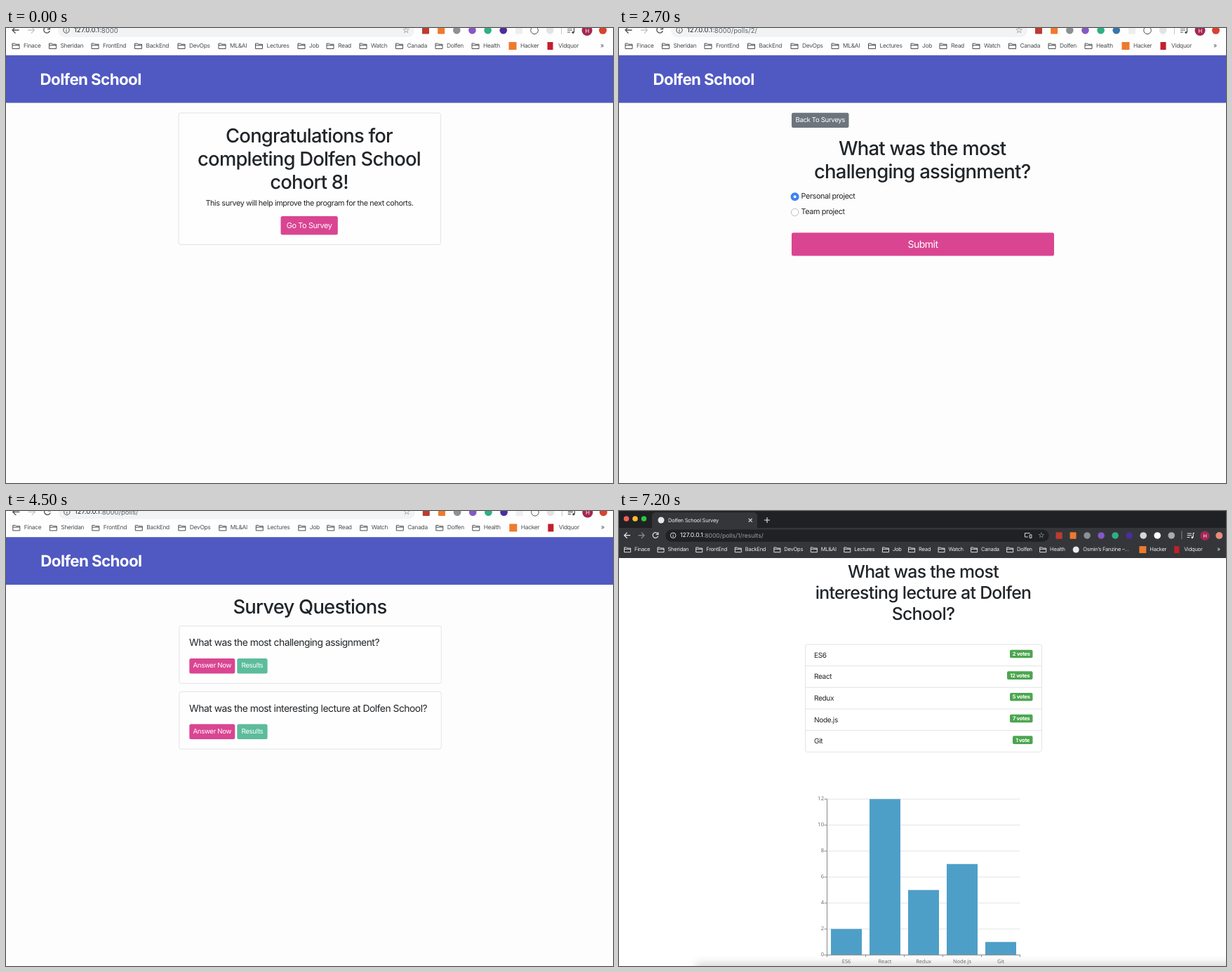
An HTML page that plays this animation: 865 by 648 pixels, repeating every 8000 ms.

```html
<!DOCTYPE html>
<html lang="en">
<head>
<meta charset="utf-8">
<title>Survey walkthrough</title>
<style>
  html, body { margin: 0; width: 100%; height: 100%; overflow: hidden; background: #fdfdfd; }
  svg { display: block; width: 865px; height: 648px; }
  text { font-family: Inter, sans-serif; dominant-baseline: central; letter-spacing: -.035em; text-rendering: geometricPrecision; white-space: pre; }
  .big { letter-spacing: -.028em; }
  .url text { letter-spacing: 0; }
  .star text { font-family: "DejaVu Sans", sans-serif; }
  .chart text { font-family: "Open Sans", sans-serif; letter-spacing: 0; }
</style>
</head>
<body>
<svg id="stage" viewBox="0 0 865 648"></svg>
<script>
const INK = '#212529', PINK = '#da4592', GREEN = '#5cbc9c', GREY = '#6c757d', BRAND = '#5059c1', LINE = '#e3e3e3';
const SCHOOL = 'Dolfen School';
const CHALLENGE = ['What was the most', 'challenging assignment?'];
const LECTURE = ['What was the most', 'interesting lecture at Dolfen', 'School?'];
const PROJECTS = ['Personal project', 'Team project'];
const TOPICS = ['ES6', 'React', 'Redux', 'Node.js', 'Git'];
const BOOKMARKS = ['Finace', 'Sheridan', 'FrontEnd', 'BackEnd', 'DevOps', 'ML&amp;AI', 'Lectures', 'Job', 'Read', 'Watch', 'Canada', 'Dolfen', 'Health'];
const BOOKMARK_X = [25, 77.5, 138, 199.5, 261, 319, 371.5, 432, 473, 520, 571.5, 628, 680];

const text = (x, y, str, size, fill = INK, anchor = 'start', weight = 400) =>
  `<text x="${x}" y="${y}" font-size="${size}" fill="${fill}" text-anchor="${anchor}" font-weight="${weight}"${size > 20 ? ' class="big"' : ''}>${str}</text>`;
const rect = (x, y, w, h, fill, r = 0, extra = '') =>
  `<rect x="${x}" y="${y}" width="${w}" height="${h}" rx="${r}" fill="${fill}" ${extra}/>`;
const circle = (x, y, r, fill, extra = '') => `<circle cx="${x}" cy="${y}" r="${r}" fill="${fill}" ${extra}/>`;
const path = (d, stroke, width = 1, extra = '') =>
  `<path d="${d}" fill="none" stroke="${stroke}" stroke-width="${width}" ${extra}/>`;
const move = (transform, body) => `<g transform="${transform}">${body}</g>`;
const styled = (name, body) => `<g class="${name}">${body}</g>`;
const button = (x, y, w, h, label, size, fill) =>
  rect(x, y, w, h, fill, 2.5) + text(x + w / 2, y + h / 2, label, size, '#fff', 'middle');
const card = (y, h) => rect(246, y, 373.5, h, '#fefefe', 3, `stroke="${LINE}"`);
const heading = (lines, x, y, size, step) =>
  lines.map((line, i) => text(x, y + i * step, line, size, INK, 'middle', 500)).join('');

// Browser controls and bookmarks; the dark window is wider, so its right part moves by `shift`.
function toolbar(url, dark, question) {
  const ink = dark ? '#e8eaed' : '#4b4e52', faint = dark ? '#8b8d91' : '#c4c6c9';
  const shift = dark ? 96.3 : 0, gap = dark ? 8 : 0;
  const host = url.slice(0, 9), rest = url.slice(9);
  const left =
    rect(74, -6, 508 + shift, 19, dark ? '#202124' : '#f1f3f4', 9.5) +
    path('M18.5 3h-9M13.5 -1.5L9 3l4.5 4.5', ink, 1.3) +
    path('M31 3h9M36 -1.5L40.5 3l-4.5 4.5', faint, 1.3) +
    path('M61.5 0a4.3 4.3 0 1 0 .8 4M62.5 -2v3.5h-3.5', ink, 1.3) +
    circle(86, 3, 4.2, 'none', `stroke="${ink}"`) + path('M86 2.5v3M86 .5v1', ink) +
    styled('url', text(97, 3.5, `${host}<tspan fill="${dark ? '#9aa0a6' : '#5f6368'}">${rest}</tspan>`, 9.5, dark ? '#fff' : INK)) +
    BOOKMARKS.map((name, i) => {
      const x = BOOKMARK_X[i];
      return move(`translate(${x - 16.5} 20.5)`,
        path('M.5 1.5h3.6l1 1.2h5.4v6.3h-10zM.5 4.2h10', ink, 1, `fill="${dark ? 'none' : '#d5d6d8'}"`)) +
        text(x, 25.5, name, 8.4, ink);
    }).join('') +
    (dark ? path('M640.5 -.5h8M640.5 -.5v6h5M648 2h3v5h-3z', ink) + circle(721, 25.5, 5, ink) +
      text(732, 25.5, 'Osmin’s Fanzine –…', 8.4, ink) : '');

  const icons = ['#bd3b32', '#ee7a2e', '#8d9094', '#8558c4', '#2faf83', question ? '#3974a8' : '#4b2d9c',
    dark ? '#d5d7da' : '#eeeeef', dark ? '#fff' : 'none', dark ? '#a8abaf' : '#e2e3e5'];
  const right =
    styled('star', text(570, 3, '☆', 12, ink, 'middle')) +
    icons.map((fill, i) => {
      const x = 598 + i * 22.15;
      return i < 2 || i === 6 && !dark ? rect(x - 5, -2, 10, 10.5, fill, 1)
        : circle(x, 3.3, 5.3, fill, fill === 'none' ? `stroke="${ink}"` : '');
    }).join('') +
    path('M791.5 -4v13', faint) +
    path('M800 0h7M800 3h7M800 6h4M809.5 6v-6.5h2', ink, 1.2) + circle(808, 6.3, 1.6, ink) +
    circle(828, 3.5, 7.5, '#a32754') + text(828, 3.5, 'H', 8, '#fff', 'middle') +
    circle(850.5, 3.3, 5.5, dark ? '#e58c7b' : '#d9422e') +
    move(`translate(${gap} 0)`,
      rect(716.5, 20, 11, 11, '#ee7a2e') + text(733, 25.5, 'Hacker', 8.4, ink) +
      rect(771.5, 20, 8, 11, '#c21f2c') + text(787, 25.5, 'Vidquor', 8.4, ink)) +
    text(849.5, 25.5, '»', 9, ink, 'middle');
  return left + move(`translate(${shift} 0)`, right);
}

// Light window; every page sits slightly off from the previous one.
const page = (dx, dy, route, body, question) => move(`translate(${dx} ${dy})`,
  rect(-9, -9, 890, 48, '#fefefe') + toolbar('127.0.0.1:8000' + route, false, question) +
  rect(-9, 38.8, 890, 67.8, BRAND) + text(48.5, 73.5, SCHOOL, 22.4, '#fff', 'start', 700) + body);

const welcome = () => page(0, 0, '', card(121, 187.5) +
  heading(['Congratulations for', `completing ${SCHOOL}`, 'cohort 8!'], 432, 152.5, 27.4, 33.3) +
  text(432.5, 249, 'This survey will help improve the program for the next cohorts.', 10.8, INK, 'middle') +
  button(391.5, 268, 81.3, 26.5, 'Go To Survey', 10.9, PINK));

const survey = (dx, dy) => page(dx, dy, '/polls/',
  heading(['Survey Questions'], 432.2, 138, 27.4, 0) +
  [CHALLENGE.join(' '), `What was the most interesting lecture at ${SCHOOL}?`].map((question, i) => {
    const y = 165.4 + i * 93.5;
    return card(y, 81.7) + text(260.3, y + 24.7, question, 13.85) +
      button(260.5, y + 46.2, 65, 21.4, 'Answer Now', 9.7, PINK) +
      button(328.5, y + 46.2, 43.3, 21.4, 'Results', 9.7, GREEN);
  }).join(''));

function poll(dx, dy, id, lines, options, picked) {
  const top = 240 + 33.3 * (lines.length - 2);
  const radios = options.map((option, i) => {
    const y = top + i * 22.15;
    return (i === picked
      ? circle(250.6, y + .3, 6, '#3f83f2') + circle(250.6, y + .3, 2, '#fff')
      : circle(250.6, y + .3, 5.2, '#fff', 'stroke="#bbb"')) + text(259.5, y - .3, option, 10.8);
  }).join('');
  return page(dx, dy, `/polls/${id}/`, button(246, 120.7, 81.5, 21.3, 'Back To Surveys', 9.6, GREY) +
    heading(lines, 432.2, 170.5, 27.5, 33.3) + radios +
    button(246, top + 22.15 * options.length + 7.2, 374, 33, 'Submit', 14, PINK), true);
}

function chart(top, labels, votes) {
  const x0 = 296.5, width = 275, bottom = top + 222, max = Math.max(...votes), step = width / labels.length;
  let out = '';
  for (let v = 0; v <= max; v += 2) {
    const y = bottom - 222 * v / max;
    out += path(`M${x0} ${y}h${width}`, LINE) + path(`M${x0 - 4} ${y}h4`, '#888') +
      text(x0 - 4.5, y, v, 7.6, '#666', 'end');
  }
  labels.forEach((label, i) => {
    const x = x0 + i * step, h = 222 * votes[i] / max;
    out += rect(x + step * .1, bottom - h, step * .8, h, '#4e9fc8') +
      path(`M${x} ${bottom}v3`, '#888') + text(x + step / 2, bottom + 9.5, label, 7.4, '#666', 'middle');
  });
  return styled('chart', out + path(`M${x0} ${top}V${bottom}h${width}v3`, '#888'));
}

function results(id, lines, labels, votes, scroll) {
  const first = 186 - scroll, list = first + 30 * (lines.length - 1) + 44, row = 30.65;
  const rows = labels.map((label, i) => {
    const y = list + i * row, badge = votes[i] + (votes[i] > 1 ? ' votes' : ' vote');
    const w = 4 * badge.length + 4.5;
    return (i ? path(`M265.5 ${y}h337`, LINE) : '') + text(278, y + 15.7, label, 10.1) +
      rect(589.5 - w, y + 7.7, w, 11.6, '#4ca64f', 2) +
      text(589.5 - w / 2, y + 13.5, badge, 7.5, '#fff', 'middle', 700);
  }).join('');
  const header = 67 - scroll;
  return rect(0, 0, 865, 648, '#fff') +
    rect(110, 644, 780, 20, '#999', 0, 'style="filter:blur(6px);opacity:.4"') +
    rect(0, header, 865, 61, BRAND) + text(87, header + 31, SCHOOL, 20, '#fff', 'start', 700) +
    button(265.5, header + 73.5, 73.5, 19.3, 'Back To Surveys', 8.7, GREY) +
    heading(lines, 433.5, first, 24.8, 30) +
    rect(265.5, list, 337, row * labels.length, 'none', 3, `stroke="${LINE}"`) + rows +
    chart(list + row * labels.length + 67, labels, votes) +
    rect(0, 0, 865, 25, '#202124') + rect(47, 2, 150, 30, '#35363a', 5) + rect(0, 24, 865, 43, '#35363a') +
    ['#ff5f57', '#febc2e', '#28c840'].map((fill, i) => circle(10.5 + i * 12.5, 11, 3.8, fill)).join('') +
    circle(60, 13, 4.5, '#e8eaed') + text(70, 13, `${SCHOOL} Survey`, 7.6, '#e8eaed') +
    path('M184.7 10.7l5 5M189.7 10.7l-5 5M207 13h8M211 9v8', '#e8eaed', 1.1) +
    move('translate(-.6 32) scale(.904)', toolbar(`127.0.0.1:8000/polls/${id}/results/`, true));
}

const scenes = [
  welcome(),
  survey(1.5, -1),
  poll(.5, -.5, 2, CHALLENGE, PROJECTS),
  poll(0, 0, 2, CHALLENGE, PROJECTS, 0),
  results(2, CHALLENGE, PROJECTS, [8, 12], 0),
  survey(.8, -1.6),
  poll(0, 0, 1, LECTURE, TOPICS),
  poll(.4, -.8, 1, LECTURE, TOPICS, 2),
  results(1, LECTURE, TOPICS, [2, 12, 5, 7, 1], 100)
];

const stage = document.getElementById('stage');
let shown = -1;
function tick() {
  const now = Math.floor(performance.now() % 8000 / 900);
  if (now !== shown) stage.innerHTML = scenes[shown = now];
  requestAnimationFrame(tick);
}
tick();
</script>
</body>
</html>
```
